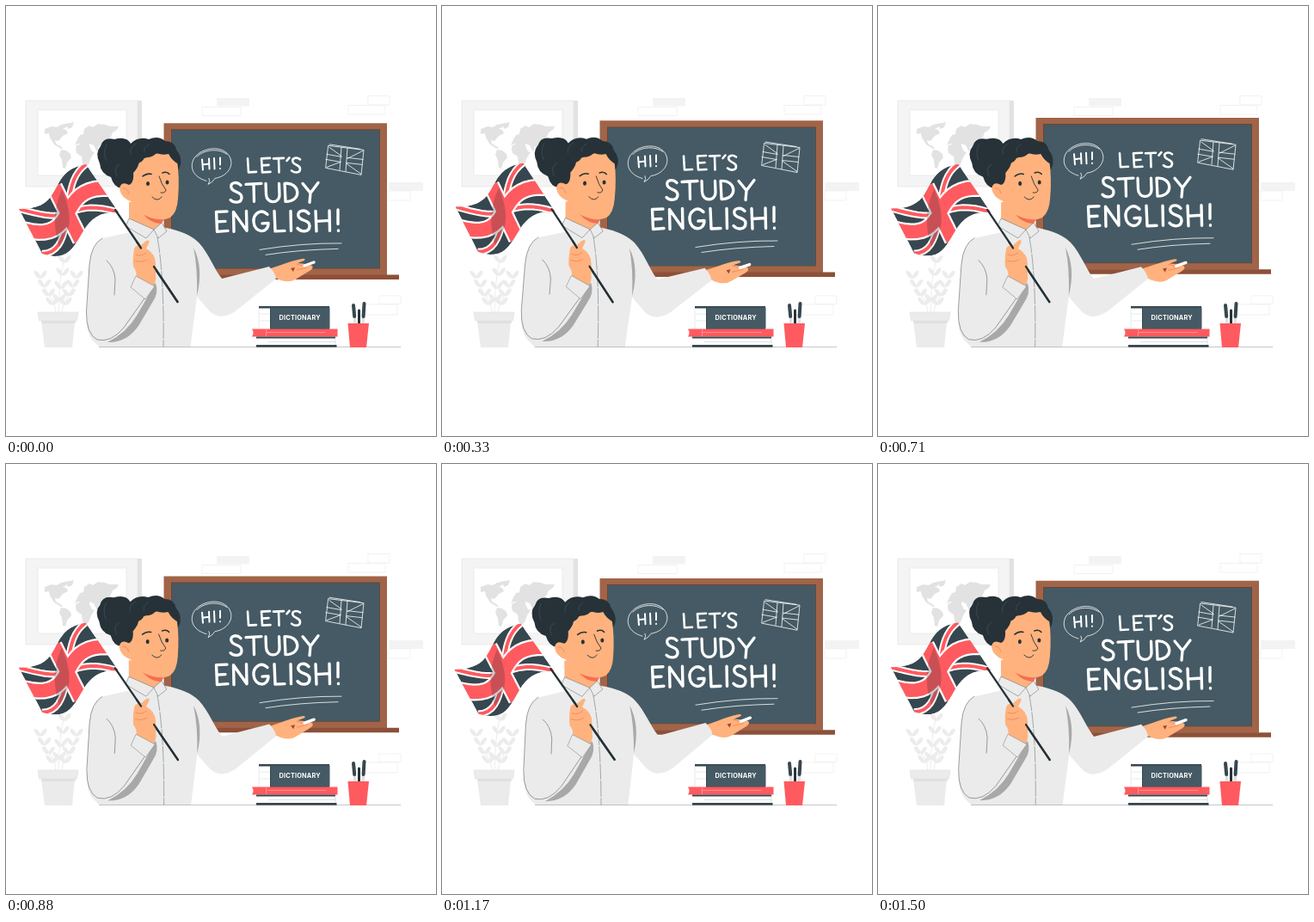
An HTML page for the animation above (1.54 s loop, 500 px wide and 500 px high).

```html
<!DOCTYPE html>
<html lang="en">
<head>
<meta charset="utf-8">
<title>Let's study English</title>
<style>
html, body { margin: 0; width: 100%; height: 100%; overflow: hidden; background: #fff; }
svg { display: block; width: 100%; height: 100%; }
.line { fill: none; stroke-linecap: round; stroke-linejoin: round; }
.skin { fill: #ffb27d; }
.crease { stroke: #f0795c; stroke-width: .7; }
</style>
</head>
<body>
<svg viewBox="0 0 500 500">
  <defs>
    <clipPath id="aboveFloor"><path d="M0 0H500V397H0Z"/></clipPath>
    <clipPath id="flagShape"><path id="flagClip"/></clipPath>
  </defs>

  <g fill="none" stroke="#ededed" stroke-width=".7">
    <path fill="#f3f3f3" stroke="none" d="M245 107H283V116.500H245ZM445 205H485V215H445Z"/>
    <path d="M228 117.500H273V127.500H228ZM421 104.500H446V115H421ZM398 115.500H441V126H398ZM445 215H470V226H445ZM434 337H459V346.500H434ZM412 347H455V359H412Z"/>
  </g>

  <g id="picture">
    <path fill="#e2e2e2" d="M150 110H158V210H150Z"/>
    <path fill="#f4f4f4" stroke="#e4e4e4" stroke-width=".7" d="M23 110H153V210H23Z"/>
    <path fill="#fff" stroke="#e6e6e6" stroke-width=".7" d="M37 121H140V197H37Z"/>
    <path fill="#e2e2e2" d="M45 143l8-3 6 1 5-3 9-2-3 5-4 2 4 1 2 4-6 3-5 6-4-1 1 4 5 3 3 2-2 1-8-5-5-8-1-5-5 1ZM64 167l6 1 5 4 1 4-5 6-2 7-3-1-1-9-3-6ZM70 137l9-2-2 6-5 2ZM82 162l7-2 8 3 3 6 3 1-4 6-3 8-4 4-3-5-1-8-6-4-1-5ZM83 155l3-5 4-1 1-6 6-4 4 2 6-4 8 1 6 2 10 0-2 4-5 3-2 5-4 4-1 5-3 1 1 7-4-5-3-1-2 7-4-8-5-2 0 4-5 3-3-6-5-1-4 2ZM115 174l6-2 5 4 1 6-4 2-4-3-5 1Z"/>
  </g>

  <g id="plant">
    <path class="line" stroke="#e8e8e8" stroke-width=".8" d="M58 356C57 340 47 335 40 318M61 356C62 330 63 310 68 294M65 356C67 340 78 332 82 318"/>
    <g id="leaves" fill="#ececec"></g>
    <path fill="#ebebeb" d="M41 367H80L77 397H45Z"/>
    <path fill="#e0e0e0" d="M41 366H81L80.500 369H41.500Z"/>
    <path fill="#ebebeb" stroke="#e0e0e0" stroke-width=".6" d="M37 356H84L82.500 366H38.500Z"/>
  </g>

  <g id="board">
    <path fill="#a16448" d="M183.500 136.200H443V313H183.500Z"/>
    <path fill="#6b4434" d="M192 143.300H435V305.500H192Z"/>
    <path fill="#455a64" d="M193 144.300H434.300V304.800H193Z"/>
    <path fill="#8d5039" d="M183.500 312.500H457V318H183.500Z"/>
    <g class="line" stroke="#fff" transform="translate(0 -.6)">
      <g stroke-width=".8">
        <path d="M233 204C219 200 213 190 218 179C225 166 249 161 259 174C267 186 257 199 243 201Q240 206 235 208Q238 204 236 201M222 176C229 168 246 165 257 173"/>
        <path d="M375 163L416 168L413 197L372 189ZM376 161.500L412 167"/>
        <path d="M390 165L388 191M397 166L395 193M373 173L390 176M397 177L415 179M372 179L389 182M396 183L414 185M376 165L390 175M415 169L397 178M373 188L389 182M413 196L396 184"/>
        <path d="M295 284Q344 276 390 276.500M302 290Q340 284 386 283"/>
      </g>
      <path role="img" aria-label="HI!" stroke-width="2" d="M228 179L229 191M236 178L236.500 190M228.500 185L236 184M242 177.500L242.500 190M249 177L249 185M249 189.500v.2"/>
      <path role="img" aria-label="LET'S" stroke-width="2.600" d="M281 178L282 194L291 193.500M307 177.500L297 178L298 194L307.500 193.500M298 186L305.500 185.500M311 178L323 177.500M317 178L317.500 194M329.500 177L326.500 180.500M342 179C337 175.500 332 178 333.500 182C335 186 342 185 342 190C342 195 335 195 332 192"/>
      <path role="img" aria-label="STUDY" stroke-width="3.300" d="M273 209C268 204 260 206 262 212C264 218 274 216 274 223C274 230 265 230 261 226M279 208L297 207M288 208L288.500 228M302 207L302.500 220C303 231 318 231 318 220L317.500 207M324 207L325 228C345 228 342 205 324 207M345 207L354 218L363 206M354 218L353 229"/>
      <path role="img" aria-label="ENGLISH!" stroke-width="3.400" d="M257 239.500L244.500 240L245.500 263L258 262M245 251.500L255 251M265 263L264.500 240L280 262L279.500 239M304 243C296 235 287 243 288 252C289 265 305 266 305 253L298 253.500M312 239L313 262.500L324 262M331 239L331.500 262M352 242C347 236 338 239 340 245C342 251 353 249 353 256C353 264 343 264 339 259M360 239L361 262.500M376 238.500L376.500 262M360.500 251L376 250M386 237.500L386 254M386.500 261.500v.5"/>
    </g>
  </g>

  <g clip-path="url(#aboveFloor)">
    <g id="teacher">
      <g id="chalkHand">
        <path class="skin" d="M305 306L320 301Q333 296 344 294Q349 293 347 296L339 299Q351 300 356 302Q358 305 353 308L338 317Q328 324 313 316Z"/>
        <path class="line crease" d="M338 300Q345 303 352 302M338 307L350 304"/>
        <path fill="#a8452f" d="M331 305L336 304L334 309Z"/>
        <path class="line" stroke="#fff" stroke-width="3.400" d="M347 302L358 298"/>
      </g>

      <path fill="#ebebeb" d="M158 260Q172 254 186 258Q212 263 224 275C236 288 242 306 251 317L306 303Q313 310 314 317L268 354Q250 367 237 355L222 338L214 400H112L100 388Q92 378 94 352L97 301Q99 277 113 270Z"/>
      <path fill="#a8a8a8" d="M118 391Q140 380 152 360L174 322Q178 334 170 345L154 372Q140 392 118 391ZM218 281Q230 304 222 337Q223 305 218 281Z"/>
      <path class="line" stroke="#6d777c" stroke-width=".7" d="M112 270Q99 277 97 301L93.500 355Q93 381 106 388Q122 392 137 374L173 323M126 336L127 318Q126 304 117 296"/>
      <path class="line" stroke="#808a8e" stroke-width=".7" stroke-dasharray="18 2" d="M176 269Q184 313 183 397"/>

      <path class="skin" d="M143 228L143 249Q155 260 171 261Q181 259 181 250V230Z"/>
      <path fill="#f56f50" d="M157 239Q170 248 184 247L181 253Q167 253 157 239Z"/>
      <path fill="#ebebeb" stroke="#70797d" stroke-width=".6" d="M143 247L139 256L163 270L172 260ZM172 260L181 252L187 262L177 270Z"/>

      <path fill="#263238" d="M141 210Q127 216 122 199Q110 195 109 183Q103 171 110 163Q113 152 126 155Q140 151 145 160Q154 151 166 155Q177 150 185 157Q196 157 198 167Q207 178 201 190L188 187L156 214Z"/>
      <path class="skin" d="M145 207Q149 203 148 193Q155 188 155 178Q163 178 168 172Q176 173 184 169Q193 171 199 180Q202 200 200 224Q199 240 191 246Q181 251 165 245Q151 240 145 227Q134 223 132 213Q133 203 143 208Z"/>
      <path fill="#263238" d="M141 206Q147 205 147 195Q153 190 152 183Q159 182 161 176Q170 177 175 171Q182 174 189 172Q193 180 201 184Q202 172 194 165L170 160L146 169Z"/>
      <path class="line" stroke="#455a64" stroke-width=".6" d="M117 161Q112 171 117 180M132 184Q124 188 129 198M151 160Q143 164 145 172M166 161Q159 164 161 170"/>
      <path class="line" stroke="#263238" stroke-width="1.600" d="M159 198Q164 194 169 195.500M182 194Q187 192 190 195.500"/>
      <path class="line" stroke="#263238" stroke-width=".9" d="M178 198Q181 208 186 214Q185 218 180 217M170 222Q176 228.500 181 222"/>
      <path class="line crease" d="M136 212Q141 211 143 218"/>
      <g fill="#263238"><ellipse cx="165" cy="206.500" rx="2" ry="2.600"/><ellipse cx="187.500" cy="205" rx="2" ry="2.600"/></g>

      <g id="flag" clip-path="url(#flagShape)"></g>
      <path class="line" stroke="#263238" stroke-width="2.300" d="M127 237L199.500 344"/>
      <path class="skin" d="M149 283Q150 278 156 279L163 273Q168 271 166 276L163 282Q174 288 174 300L174 313Q176 322 168 327L151 317Q153 309 148 303Q147 294 149 283Z"/>
      <path class="line crease" d="M151 289Q157 292 163 287M150 296Q157 299 164 295"/>
      <path class="line" stroke="#263238" stroke-width="2.300" d="M152 274L157 281.500M172 303L199.500 344"/>
      <path fill="#ebebeb" stroke="#808a8e" stroke-width=".6" d="M151 314L173 326L162 341L145 327Z"/>
    </g>
  </g>

  <path stroke="#a9afb2" stroke-width=".7" d="M108 396.500H459"/>

  <g id="books">
    <path fill="#fff" d="M294 350H320V375H294Z"/>
    <path fill="#37474f" d="M294 349H376V376H307V351.500H294Z"/>
    <path fill="#455a64" d="M308 350.500H376.500V375H308Z"/>
    <path stroke="#cfd4d6" stroke-width=".5" d="M295 358H307M295 366H307M294 352V375"/>
    <text x="341.700" y="365.300" fill="#fff" text-anchor="middle" font-family="Inter, sans-serif" font-size="7.300" font-weight="700" letter-spacing=".2">DICTIONARY</text>
    <path fill="#ff5a5f" d="M286 375.500H385.500V384.500H286Q289 380 286 375.500Z"/>
    <path stroke="#ffb3b5" stroke-width=".6" d="M302.500 376V384M303 379.500H372"/>
    <path fill="#fff" d="M292 386H383V394H292Z"/>
    <path fill="#37474f" d="M291 384.500H383V386.500H291ZM291 394H384.500V396.800H291Z"/>
    <path stroke="#c5cacc" stroke-width=".6" fill="none" d="M305 390.500H383M383 387V394"/>
  </g>

  <g id="pens">
    <path class="line" stroke="#dfe2e3" stroke-width="3.600" d="M404.500 352L406 370M416.300 350L415 370"/>
    <path class="line" stroke="#37474f" stroke-width="4" d="M404 348L405.200 361M416.500 346L415.600 361"/>
    <path class="line" stroke="#263238" stroke-width="3" d="M410.500 354V370"/>
    <path fill="#ff5a5f" d="M397.500 369H422L419 397H400Z"/>
  </g>
</svg>

<script>
const $ = id => document.getElementById(id);
const LOOP = 1540, FLOAT = 6.7, SWAY = 1;
const RED = '#ff5a5f', WHITE = '#fff', NAVY = '#37474f';

// Plant leaves in pairs along each stem: base, tip
$('leaves').innerHTML = [[54, 348, 40, 317], [62, 344, 68, 299], [69, 348, 82, 317]]
  .map(([x0, y0, x1, y1]) => [0, .33, .67, 1].map(k => {
    const x = x0 + (x1 - x0) * k, y = y0 + (y1 - y0) * k;
    return [-38, 38].map(a =>
      `<ellipse cx="${x}" cy="${y - 6}" rx="2.300" ry="5.500" transform="rotate(${a} ${x} ${y})"/>`).join('');
  }).join('')).join('');

// Waving cloth: u runs from the pole to the free end, v down the pole
const bezier = (t, a, b, c, d) => {
  const s = 1 - t;
  return s * s * s * a + 3 * s * s * t * b + 3 * s * t * t * c + t * t * t * d;
};
function cloth(u, v) {
  const mix = (a, b) => a + (b - a) * v;
  return [
    mix(bezier(u, 93, 45, 72, 15), bezier(u, 131, 75, 95, 42)),
    mix(bezier(u, 184, 192, 236, 236), bezier(u, 240, 236, 306, 288))
  ];
}
function seam(u0, v0, u1, v1) {
  const points = [];
  for (let i = 0; i <= 20; i++) {
    const k = i / 20;
    points.push(cloth(u0 + (u1 - u0) * k, v0 + (v1 - v0) * k).map(n => n.toFixed(1)));
  }
  return points.join(' ');
}
const outline = `M${seam(0, 0, 1, 0)} ${seam(1, 0, 1, 1)} ${seam(1, 1, 0, 1)} ${seam(0, 1, 0, 0)}Z`;
const stripe = (d, color, width) => `<path d="${d}" fill="none" stroke="${color}" stroke-width="${width}"/>`;
const saltire = `M${seam(0, 0, 1, 1)}M${seam(0, 1, 1, 0)}`;
const cross = `M${seam(-.05, .5, 1.05, .5)}M${seam(.5, -.05, .5, 1.05)}`;
$('flagClip').setAttribute('d', outline);
$('flag').innerHTML = `<path d="${outline}" fill="${NAVY}"/>`
  + stripe(saltire, WHITE, 8) + stripe(saltire, RED, 4)
  + stripe(cross, WHITE, 20) + stripe(cross, RED, 15.5)
  + '<path d="M65 213Q55 236 57 255Q58 270 62 280Q70 268 73 256Q76 238 65 213Z" fill="#263238" opacity=".25"/>';

function draw(now) {
  const p = now % LOOP / LOOP;
  const lift = FLOAT * (1 - Math.abs(2 * p - 1));
  const sway = SWAY * (1 - Math.abs(4 * ((p + .25) % 1) - 2));
  $('board').setAttribute('transform', `translate(0 ${-lift})`);
  $('teacher').setAttribute('transform', `rotate(${sway} 187 275)`);
  requestAnimationFrame(draw);
}
draw(0);
</script>
</body>
</html>
```
